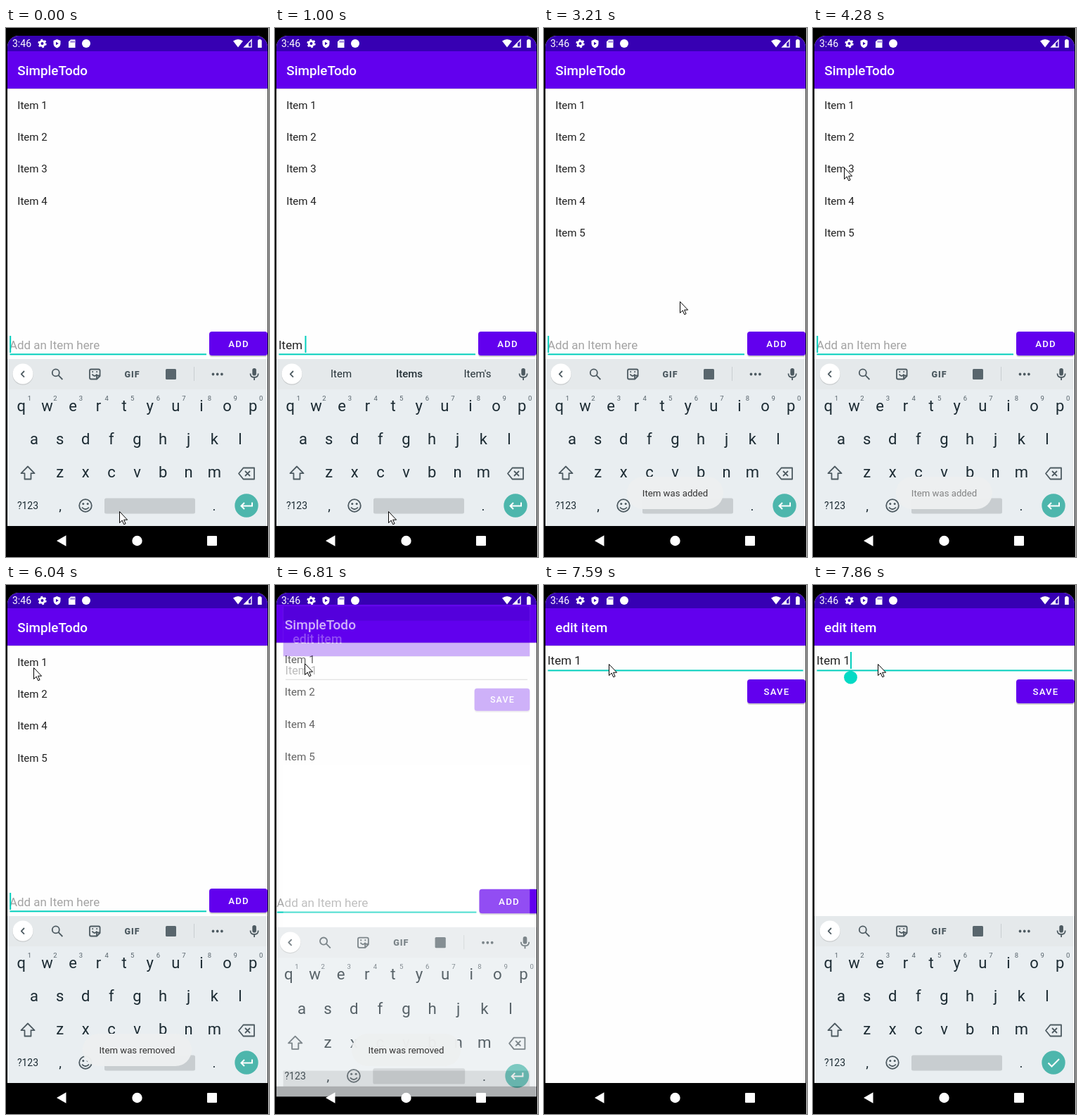
Animation of 374 by 751 pixels, one loop 8 s. Source, as an HTML page:

```html
<!DOCTYPE html>
<html lang="en">
<head>
<meta charset="utf-8">
<title>Todo list</title>
<style>
  html, body { margin: 0; width: 100%; height: 100%; overflow: hidden; background: #000; }
  svg { display: block; width: 374px; height: 751px; font-family: Roboto, sans-serif; }
  text { white-space: pre; }
  .title { font-size: 18.84px; font-weight: 500; fill: #fff; }
  .item { font-size: 15.07px; fill: #212121; }
  .field { font-size: 16.96px; fill: #212121; }
  .btn { font-size: 13.19px; font-weight: 500; letter-spacing: 1.18px; fill: #fff; text-anchor: middle; }
  .key { font-size: 22px; fill: #1c2b33; text-anchor: middle; }
  .num { font-size: 9.5px; fill: #56626a; text-anchor: middle; }
  .hint { font-size: 15px; fill: #263238; text-anchor: middle; }
  .line { fill: none; stroke: #4d5a61; stroke-width: 1.8; stroke-linejoin: round; }
  .dark { fill: #4d5a61; }
  .teal { fill: #03cfbd; }
</style>
</head>
<body>
<svg viewBox="0 0 374 751">
  <defs>
    <clipPath id="screen"><rect x="2" y="11" width="370" height="770" rx="16"/></clipPath>
    <g id="chrome">
      <rect x="2" y="11" width="370" height="696" fill="#fefefe"/>
      <rect x="2" y="11" width="370" height="22" fill="#3700b3"/>
      <rect x="2" y="33" width="370" height="53" fill="#6200ee"/>
      <rect x="2" y="86" width="370" height="1" opacity=".12"/>
    </g>
    <g id="button">
      <rect x="289" y="2" width="83" height="34" rx="4" opacity=".18"/>
      <rect x="289" width="83" height="34" rx="4" fill="#6200ee"/>
    </g>
  </defs>
  <rect width="374" height="751"/>
  <rect x="373" width="1" height="751" fill="#e0e0e0"/>
  <g clip-path="url(#screen)">
    <g id="main">
      <use href="#chrome"/>
      <text class="title" x="16.3" y="67">SimpleTodo</text>
      <g id="items"></g>
      <rect class="teal" x="5.5" y="462.3" width="279.5" height="2"/>
      <text class="field" id="entry" x="5" y="456"></text>
      <rect class="teal" id="caret" y="437" width="2" height="24"/>
      <use href="#button" y="431"/>
      <rect id="ripple" x="289" y="431" width="83" height="34" rx="4" fill="#fff"/>
      <text class="btn" x="331" y="453">ADD</text>
    </g>
    <g id="edit">
      <use href="#chrome"/>
      <rect x="2" y="707" width="370" height="44"/>
      <text class="title" x="16.3" y="67">edit item</text>
      <text class="field" x="5" y="113.3">Item 1</text>
      <rect id="rule" x="5.5" y="120.4" width="363"/>
      <rect class="teal" id="editCaret" x="53" y="95" width="2" height="24"/>
      <path id="handle" d="M53.5 121l6.8 3.6a9.4 9.4 0 1 1-13.6 0z" fill="#03dac5"/>
      <use href="#button" y="134"/>
      <text class="btn" x="331" y="156">SAVE</text>
    </g>
    <g id="keyboard">
      <rect x="2" y="470" width="370" height="237" fill="#e9eef1"/>
      <rect x="2" y="470" width="370" height="43" fill="#e5e9eb"/>
      <circle cx="24" cy="492" r="14.8" opacity=".12"/>
      <circle cx="24" cy="491" r="14.5" fill="#fff"/>
      <path class="line" d="M26 487l-4.2 4.3 4.2 4.3"/>
      <g id="tools">
        <g class="line">
          <circle cx="70.8" cy="489.4" r="5"/><path d="M74.6 493.2l5.8 5.8"/>
          <path d="M121 484.5h10.6q2 0 2 2v7.5l-4.5 4.5H121q-2 0-2-2v-10q0-2 2-2zM129 498v-4.5h4.5M122.5 491.5q3.5 5 7 0M123.2 487.2v1.8M129.2 487.2v1.8"/>
        </g>
        <text class="dark" x="179.5" y="495.7" text-anchor="middle" font-size="12.5" font-weight="900" letter-spacing=".9">GIF</text>
        <rect x="227" y="484" width="15" height="15" rx="1.5" fill="#59666d"/>
        <path d="M267.5 481v20" stroke="#c9ced1"/>
        <path d="M294.5 491.5h13" stroke="#4d5a61" stroke-width="3.8" stroke-linecap="round" stroke-dasharray="0 6.2"/>
      </g>
      <g id="words"></g>
      <rect class="dark" x="350.3" y="483" width="5.6" height="10.5" rx="2.8"/>
      <path class="line" d="M347.5 490.5q0 5.5 5.6 5.5t5.6-5.5M353.1 496v4"/>
      <g id="keys"></g>
      <g class="line">
        <path d="M31 622.5l-9.5 9.7h5v8.3h9v-8.3h5z"/>
        <path d="M337.5 624.5H353v16h-15.5l-6.5-8zM340 629l7 7M347 629l-7 7"/>
        <circle cx="113" cy="678" r="8.8"/><path d="M108 680.5q5 5.5 10 0"/>
      </g>
      <circle class="dark" cx="109.8" cy="675.4" r="1.5"/><circle class="dark" cx="116.2" cy="675.4" r="1.5"/>
      <text class="key" x="31" y="683" style="font-size:14px">?123</text>
      <text class="key" x="77" y="685" style="font-size:19px">,</text>
      <text class="key" x="296" y="685" style="font-size:19px">.</text>
      <rect x="140" y="667.5" width="129" height="22" rx="2.5" fill="#c8cdd0"/>
      <circle cx="342" cy="678" r="16.7" fill="#4db6ac"/>
      <path id="enter" fill="none" stroke="#fff" stroke-width="2"/>
    </g>
    <g fill="#fff">
      <path d="M72 728l13.5-7.8v15.6z"/><circle cx="186.5" cy="728" r="7.2"/><rect x="286" y="721" width="14" height="14" rx="1"/>
      <text x="9" y="27" font-size="14">3:46</text>
      <circle cx="51.5" cy="22" r="3.4" fill="none" stroke="#fff" stroke-width="2.8"/>
      <circle cx="51.5" cy="22" r="5.2" fill="none" stroke="#fff" stroke-width="2" stroke-dasharray="2.7 2.745"/>
      <path d="M72.5 16l5 2v4q0 4.5-5 6.5-5-2-5-6.5v-4z"/><path d="M71 19.8l3.8 2.2-3.8 2.2z" fill="#3700b3"/>
      <path d="M92 16.5h6.5v11.5H89v-8.5z"/><path d="M92.6 18.3v2.4M94.7 18.3v2.4M96.8 18.3v2.4" stroke="#3700b3"/>
      <circle cx="114" cy="22" r="6"/>
      <path d="M323 18.5q7-5 14 0l-7 9z"/><path d="M349 17v10h-10z" fill="none" stroke="#fff" stroke-width="1.4"/><path d="M345 21.5v5.5h-5.5z"/>
      <path d="M358 17.2h1.2V16h3.2v1.2h1.3V28H358z"/>
    </g>
    <g id="toast">
      <rect id="toastBox" y="637" height="46" rx="23" fill="#eef0f0"/>
      <text id="toastText" x="186.5" y="665" font-size="13.19" fill="#333" text-anchor="middle"></text>
    </g>
  </g>
  <path id="mouse" d="M.5 .5v16l3.7-3.5 2.5 5.7 2.4-1-2.5-5.5h5z" fill="#fff" stroke="#000"/>
</svg>
<script>
const LOOP = 8000, PITCH = 36.6, ROW = 45.2, BLINK = 500;
// moments of the main events
const ADD = 2030, REMOVE = 5150, OPEN = 6700, FOCUS = 7090, TAP = 7600;
const suggestions = {
  I: ["I", "I'm", "I'll"], It: ["It", "It's", "Its"],
  Ite: ["Ite", "Item", "Items"], Item: ["Item", "Items", "Item's"]
};
// pointer moves: start, end, x, y
const moves = [
  [1120, 1900, 327, 447], [2420, 2700, 193, 388], [3300, 4250, 44, 198],
  [5600, 6130, 39, 110], [6760, 6960, 57, 119], [7000, 7330, 92, 112]
];

const $ = id => document.getElementById(id);
const set = (id, attrs) => Object.entries(attrs).forEach(([k, v]) => $(id).setAttribute(k, v));
const show = (id, on) => $(id).style.display = on ? "" : "none";
const zoom = (s, dy = 0) => `translate(187 ${375 + dy}) scale(${s}) translate(-187 -375)`;
const blink = age => age % (2 * BLINK) < BLINK;

// smooth rise from 0 to 1 between a and b
function ramp(t, a, b) {
  const p = Math.min(1, Math.max(0, (t - a) / (b - a)));
  return p * p * (3 - 2 * p);
}

$("keys").innerHTML = ["qwertyuiop", "asdfghjkl", "zxcvbnm"].map((row, r) => [...row].map((c, i) => {
  const x = 21.8 + PITCH * (i + [0, .5, 1.5][r]);
  const num = r ? "" : `<text class="num" x="${x + 11.5}" y="528.5">${(i + 1) % 10}</text>`;
  return `<text class="key" x="${x}" y="${543.5 + r * 47.4}">${c}</text>${num}`;
}).join("")).join("");

function typedAt(t) {
  if (t >= ADD) return "";
  const count = t < 1000 ? Math.min(4, Math.floor((t - 10) / 140)) : t < 1120 ? 5 : 6;
  return "Item 5".slice(0, Math.max(0, count));
}

function drawList(t) {
  const list = [1, 2, 3, 4, 5].filter(n => n == 5 ? t >= ADD : n != 3 || t < REMOVE);
  $("items").innerHTML = list.map((n, i) =>
    `<text class="item" x="16.3" y="${115 + i * ROW}">Item ${n}</text>`).join("");
}

function drawEntry(t) {
  const typed = typedAt(t), words = suggestions[typed.trim()];
  $("entry").textContent = typed || "Add an Item here";
  $("entry").style.fill = typed ? "" : "#a3a3a3";
  set("caret", { x: typed ? 4.3 + $("entry").getComputedTextLength() : 5.2 });
  show("caret", t < 900 || blink(t - (t < ADD ? 900 : ADD)));
  show("tools", !words);
  $("words").innerHTML = (words || []).map((w, i) =>
    `<text class="hint" x="${94 + 97 * i}" y="496" font-weight="${i == 1 ? 500 : 400}">${w}</text>`).join("");
  set("ripple", { opacity: .2 * (ramp(t, 1910, 2030) - ramp(t, 2270, 2570)) });
}

function drawScreens(t) {
  const opened = ramp(t, OPEN, OPEN + 340), focused = t >= FOCUS;
  show("main", opened < 1);
  show("edit", opened > 0);
  set("main", { transform: zoom(1 + .058 * opened) });
  set("edit", { transform: zoom(.93 + .07 * opened), opacity: Math.min(1, opened * 1.2) });
  set("rule", { height: focused ? 2 : 1, fill: focused ? "#03cfbd" : "#8a8a8a" });
  show("editCaret", t >= TAP + 100 || focused && blink(t - FOCUS));
  show("handle", t >= TAP + 100);

  const hidden = opened - ramp(t, TAP, TAP + 250);
  set("keyboard", { opacity: Math.max(0, 1 - 1.06 * hidden), transform: zoom(1 + .058 * hidden, 58 * hidden) });
  set("enter", { d: t > FOCUS ? "M334.5 678.5l5 5 10.5-10.5" : "M350 673.5v5h-15M339 674l-4.5 4.5 4.5 4.5" });
}

function drawToast(t) {
  const removed = t >= REMOVE, age = t - (removed ? REMOVE : ADD + 120);
  const fade = ramp(age, 0, 250) - ramp(age, 1950, 2350), width = removed ? 155 : 137;
  $("toastText").textContent = removed ? "Item was removed" : "Item was added";
  set("toastText", { opacity: fade });
  set("toastBox", { x: 186.5 - width / 2, width, opacity: Math.min(.97, fade * 2) });
}

function drawPointer(t) {
  const [x, y] = moves.reduce(([x, y], [a, b, toX, toY]) => {
    const p = ramp(t, a, b);
    return [x + (toX - x) * p, y + (toY - y) * p];
  }, [161, 686]);
  set("mouse", { transform: `translate(${Math.round(x)} ${Math.round(y)})` });
}

const start = performance.now();
function loop() {
  const t = (performance.now() - start) % LOOP;
  [drawList, drawEntry, drawScreens, drawToast, drawPointer].forEach(draw => draw(t));
  requestAnimationFrame(loop);
}
loop();
</script>
</body>
</html>
```
